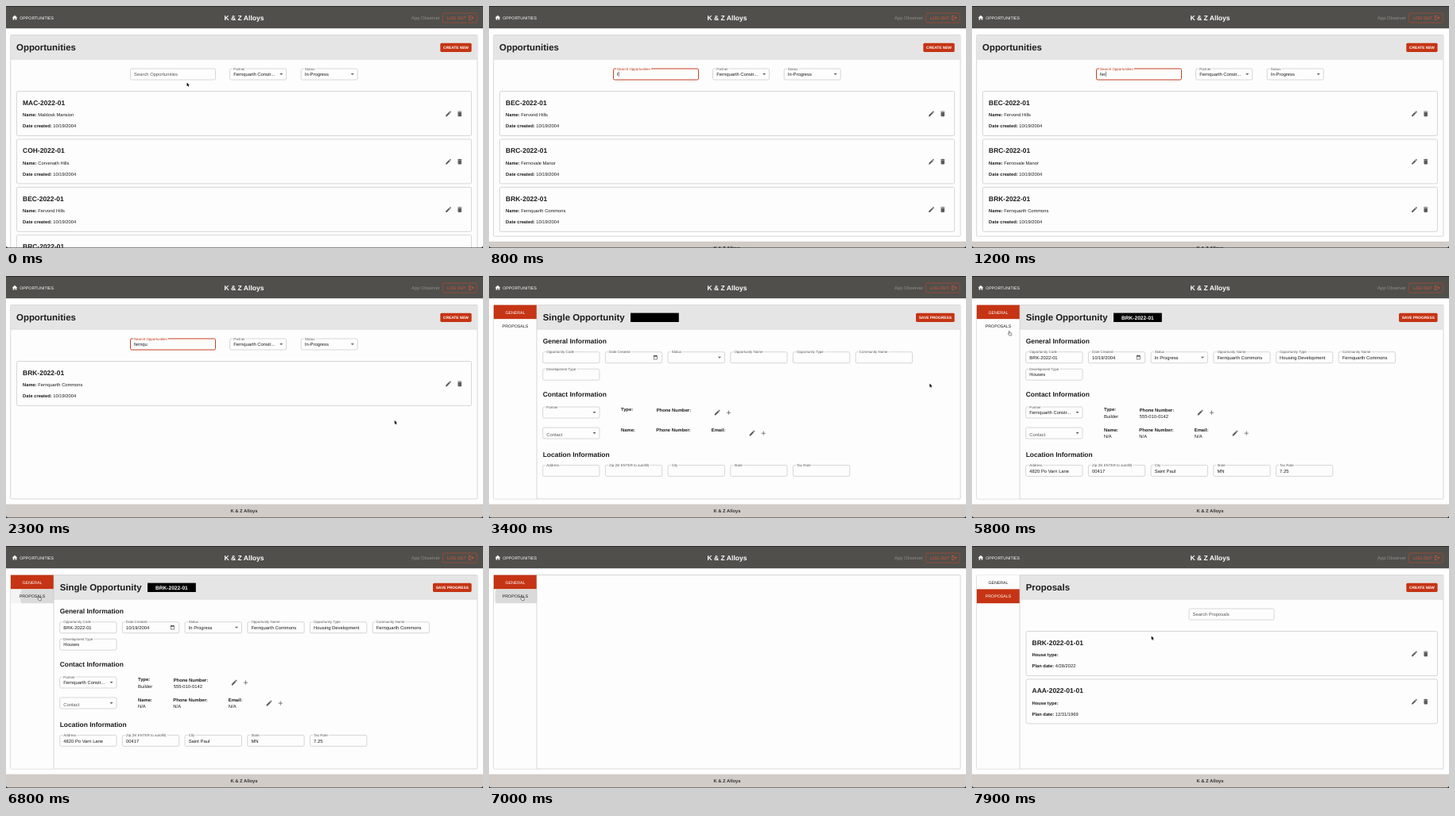
An HTML page for the animation above (8 s loop, 600 by 305 pixels).

```html
<!DOCTYPE html>
<html lang="en">
<head>
<meta charset="utf-8">
<title>Opportunities</title>
<style>
  html, body { margin: 0; width: 100%; height: 100%; overflow: hidden; background: #fefefe; }
  svg { display: block; width: 100%; height: 100%; }
  text { font-family: "Liberation Sans", Arial, sans-serif; text-rendering: geometricPrecision; white-space: pre; }
</style>
</head>
<body>
<svg id="stage" viewBox="0 0 600 305" xmlns="http://www.w3.org/2000/svg"></svg>
<script>
const LOOP = 8000, STEP = 100;
const RED = '#c53414', INK = '#1c1c1c', SOFT = '#5a5a5a', LINE = '#c6c6c6', BAND = '#e5e5e5', PAPER = '#fdfdfd';
const COMPANY = 'K &amp; Z Alloys', PARTNER = 'Fernquarth Constr...';

// Moments of the hard changes
const FOCUS = 300, OPEN = 3400, FILLED = 3500, HOVER = 5800, PRESS = 6700, BLANK = 6900, LOADED = 7200;

const ICONS = {
  edit: 'M3 17.25V21h3.75L17.81 9.94l-3.75-3.75zM20.71 7.04c.39-.39.39-1.02 0-1.41l-2.34-2.34c-.39-.39-1.02-.39-1.41 0l-1.83 1.83 3.75 3.75z',
  trash: 'M6 19c0 1.1.9 2 2 2h8c1.1 0 2-.9 2-2V7H6zM19 4h-3.5l-1-1h-5l-1 1H5v2h14z',
  plus: 'M19 13h-6v6h-2v-6H5v-2h6V5h2v6h6z',
  home: 'M10 20v-6h4v6h5v-8h3L12 3 2 12h3v8z',
  exit: 'M17 7l-1.4 1.4 2.6 2.6H8v2h10.2l-2.6 2.6L17 17l5-5zM4 5h8V3H4c-1.1 0-2 .9-2 2v14c0 1.1.9 2 2 2h8v-2H4z',
  arrow: 'M7 10l5 5 5-5z',
  calendar: 'M20 3h-1V1h-2v2H7V1H5v2H4a2 2 0 0 0-2 2v16c0 1.1.9 2 2 2h16a2 2 0 0 0 2-2V5a2 2 0 0 0-2-2zm0 18H4V8h16z'
};

const DEALS = [
  ['MAC-2022-01', 'Maldosk Mansion'],
  ['COH-2022-01', 'Corvenath Hills'],
  ['BEC-2022-01', 'Fervond Hills'],
  ['BRC-2022-01', 'Fernovale Manor'],
  ['BRK-2022-01', 'Fernquarth Commons']
];

// Search text over time
const TYPED = [[0, ''], [700, 'f'], [1000, 'fe'], [1200, 'fer'], [1400, 'fern'], [1500, 'fernqu']];

// Pointer path: time, x, y
const PATH = [
  [0, 227.5, 96.5], [1700, 227.5, 96.5], [2300, 488.8, 182], [2600, 553, 136.8], [2900, 554.3, 135.5],
  [4600, 554.3, 135.5], [4900, 275, 121], [5100, 275, 121], [5400, 68, 94], [5500, 68, 94],
  [5800, 46.5, 69.3], [6200, 41, 62.8], [7700, 41, 62.8], [7900, 225.7, 113.5], [8000, 225.7, 113.5]
];

const clamp = v => Math.max(0, Math.min(1, v));
const mix = (a, b, k) => a + (b - a) * k;
const ramp = (t, from, length) => clamp((t - from) / length);

function text(x, y, str, size = 5.83, { fill = INK, bold = false, anchor = 'start' } = {}) {
  return `<text x="${x}" y="${y}" font-size="${size}" fill="${fill}" text-anchor="${anchor}"` +
    `${bold ? ' font-weight="700"' : ''}>${str}</text>`;
}

function rect(x, y, w, h, fill, stroke = 'none', r = 0, width = .7) {
  return `<rect x="${x}" y="${y}" width="${w}" height="${h}" rx="${r}" fill="${fill}" stroke="${stroke}" stroke-width="${width}"/>`;
}

function icon(name, cx, cy, size = 9, fill = '#5c5c5c') {
  const k = size / 24;
  return `<path d="${ICONS[name]}" fill="${fill}" transform="translate(${cx - size / 2} ${cy - size / 2}) scale(${k})"/>`;
}

const measureCtx = document.createElement('canvas').getContext('2d');
function textWidth(str, size) {
  measureCtx.font = '100px "Liberation Sans", Arial, sans-serif';
  return measureCtx.measureText(str).width * size / 100;
}

// Outlined field; rise moves the label from the middle to the border
function field(x, y, w, label, value, { rise = 1, active = false, mark = '' } = {}) {
  const color = active ? RED : SOFT;
  const size = mix(5.83, 4.45, rise);
  let out = rect(x, y, w, 14, 'none', active ? RED : LINE, 1.7, active ? .95 : .7);
  if (rise > .5) out += rect(x + 3.7, y - 1, textWidth(label, size) + 1.8, 2, PAPER);
  out += text(x + 4.6, mix(y + 9.1, y + 1.6, rise), label, size, { fill: color });
  out += text(x + 4.6, y + 9.1, value);
  if (mark === 'arrow') out += icon('arrow', x + w - 6.4, y + 6.8, 10);
  if (mark === 'calendar') out += icon('calendar', x + w - 8.4, y + 6.8, 5.8, '#222');
  return out;
}

function button(x, w, label) {
  return rect(x, 46.7, w, 11.2, RED, 'none', 1.6) +
    text(x + w / 2, 54, label, 4.8, { fill: '#fff', bold: true, anchor: 'middle' });
}

function pair(x, y, label, value) {
  return `<text x="${x}" y="${y}" font-size="5.78" fill="${INK}"><tspan font-weight="700">${label}</tspan> ${value}</text>`;
}

function card(x, i, code, line1, line2) {
  const y = 107.5 + i * 60.4;
  return rect(x, y, 585.5 - x, 56, PAPER, LINE, 1.8) +
    text(x + 7.6, y + 17.3, code, 8.45, { bold: true }) +
    pair(x + 7.6, y + 31.7, ...line1) +
    pair(x + 7.6, y + 45.6, ...line2) +
    icon('edit', 556.5, y + 28.3) + icon('trash', 570.7, y + 28.3);
}

function panel(bottom, band = true) {
  return rect(5.7, 36.5, 587.3, bottom - 36.5, PAPER, LINE, 1) +
    (band ? rect(6, 36.8, 586.7, 30, BAND) + rect(6, 66.7, 586.7, .7, '#cfcfcf') : '');
}

function title(x, str) {
  return text(x, 56, str, 11.45, { bold: true });
}

function topBar() {
  return rect(0, 0, 600, 28.2, '#504f4c') + rect(0, 0, 600, .8, '#222') +
    icon('home', 11, 14.8, 8, '#fff') +
    text(17.2, 16.8, 'OPPORTUNITIES', 5.27, { fill: '#fff' }) +
    text(299.5, 18, COMPANY, 8.55, { fill: '#fff', bold: true, anchor: 'middle' }) +
    text(510, 17, 'App Observer', 5.83, { fill: '#8f8d8a' }) +
    rect(549.4, 9, 42.8, 12, 'none', '#b04a2c', 1.6) +
    text(555, 16.9, 'LOG OUT', 5.3, { fill: '#e4552d' }) +
    icon('exit', 585.2, 14.9, 7.6, '#e4552d');
}

function footer(y) {
  return rect(0, y, 600, 305 - y, '#d1ccc8') +
    text(299.5, y + 10.6, COMPANY, 5.83, { fill: '#333', bold: true, anchor: 'middle' });
}

// Dark window edge with rounded lower corners
function windowEdge() {
  return '<path d="M0 301.5Q0 304.4 3 304.4H597Q600 304.4 600 301.5V305H0Z" fill="#222"/>';
}

function ripple(t) {
  if (t < PRESS) return '';
  const r = 40 * Math.sqrt(ramp(t, PRESS - 100, 550));
  const alpha = .1 * (1 - ramp(t, LOADED, 300));
  return `<clipPath id="tab"><rect x="6" y="54.4" width="54" height="17.8"/></clipPath>` +
    `<circle cx="42" cy="64" r="${r}" fill="#000" fill-opacity="${alpha}" clip-path="url(#tab)"/>`;
}

function tabs(chosen, t) {
  const shade = Math.round(mix(253, 243, ramp(t, HOVER, 300)));
  const tab = (y, name, on, bg) => rect(6, y, 54, 17.8, on ? RED : bg);
  const name = (y, str, on) => text(33, y, str, 5.25, { fill: on ? '#fff' : INK, anchor: 'middle' });
  return rect(6, 36.8, 54, 243.9, PAPER) +
    tab(36.6, 'GENERAL', chosen === 0, PAPER) +
    tab(54.4, 'PROPOSALS', chosen === 1, `rgb(${shade},${shade},${shade})`) +
    ripple(t) +
    name(47.5, 'GENERAL', chosen === 0) + name(65.4, 'PROPOSALS', chosen === 1) +
    rect(59.7, 36.8, .7, 244, LINE);
}

function listPage(t) {
  const [typedAt, query] = TYPED.filter(([at]) => at <= t).pop();
  const shown = DEALS.filter(([, name]) => name.toLowerCase().includes(query));
  const bottom = Math.max(281, 109 + shown.length * 60.4);
  const active = t >= FOCUS;
  const caret = active && Math.floor((t - Math.max(FOCUS, typedAt)) / 500) % 2 === 0;
  let out = panel(bottom) + title(13, 'Opportunities') + button(546.3, 39.3, 'CREATE NEW');
  out += field(156.5, 79, 107, 'Search Opportunities', query, { rise: ramp(t, FOCUS - 100, 200), active });
  if (caret) out += rect(161.3 + textWidth(query, 5.83), 82.6, .5, 6.6, INK);
  out += field(281.6, 79, 71, 'Partner', PARTNER, { mark: 'arrow' });
  out += field(371.2, 79, 71, 'Status', 'In-Progress', { mark: 'arrow' });
  shown.forEach(([code, name], i) => {
    out += card(13.5, i, code, ['Name:', name], ['Date created:', '10/19/2004']);
  });
  return out + footer(bottom + 6.6);
}

function formPage(t) {
  const val = s => t >= FILLED ? s : '';
  const col = i => 67.7 + i * 78.7;
  const row = (y, items) => items.map(([label, value, mark], i) =>
    field(col(i), y, 71.3, label, val(value), { mark })).join('');
  const head = (y, s) => text(67.7, y, s, 8.45, { bold: true });
  const fact = (x, y, label, value) => text(x, y, label, 5.83, { bold: true }) + text(x, y + 8.3, val(value));
  return panel(281) + tabs(0, t) +
    title(67.7, 'Single Opportunity') + rect(178, 46.6, 60.8, 11.4, '#000') +
    text(208.4, 54.6, val('BRK-2022-01'), 6.6, { fill: '#fff', bold: true, anchor: 'middle' }) +
    button(537, 48.6, 'SAVE PROGRESS') +
    head(84.9, 'General Information') +
    row(95.7, [
      ['Opportunity Code', 'BRK-2022-01'], ['Date Created', '10/19/2004', 'calendar'],
      ['Status', 'In Progress', 'arrow'], ['Opportunity Name', 'Fernquarth Commons'],
      ['Opportunity Type', 'Housing Development'], ['Community Name', 'Fernquarth Commons']
    ]) +
    row(117.2, [['Development Type', 'Houses']]) +
    head(151.8, 'Contact Information') +
    row(165, [['Partner', PARTNER, 'arrow']]) +
    fact(166, 170.2, 'Type:', 'Builder') + fact(210.7, 170.8, 'Phone Number:', '555-010-0142') +
    icon('edit', 287.2, 172) + icon('plus', 301.5, 172) +
    rect(67.7, 191, 71.3, 14, 'none', LINE, 1.7) + text(72.3, 202, 'Contact', 5.83, { fill: SOFT }) +
    icon('arrow', 132.6, 197.8, 10) +
    fact(166, 195.6, 'Name:', 'N/A') + fact(210.3, 195.6, 'Phone Number:', 'N/A') +
    fact(279.8, 195.6, 'Email:', 'N/A') +
    icon('edit', 331, 198) + icon('plus', 345.2, 198) +
    head(227.6, 'Location Information') +
    row(238.4, [
      ['Address', '4820 Po Varn Lane'], ['Zip (hit ENTER to autofill)', '00417'],
      ['City', 'Saint Paul'], ['State', 'MN'], ['Tax Rate', '7.25']
    ]) + footer(287.6);
}

function proposalsPage(t) {
  if (t < LOADED) return panel(281, false) + tabs(0, t) + footer(287.6);
  let out = panel(281) + tabs(1, t) + title(67.7, 'Proposals') + button(546.3, 39.3, 'CREATE NEW') +
    field(273, 79, 107, 'Search Proposals', '', { rise: 0 });
  [['BRK-2022-01-01', '4/28/2022'], ['AAA-2022-01-01', '12/31/1969']].forEach(([code, date], i) => {
    out += card(68, i, code, ['House type:', ''], ['Plan date:', date]);
  });
  return out + footer(287.6);
}

function pointer(t) {
  if (t >= 100 && t < 1800) return '';
  const i = Math.max(1, PATH.findIndex(([at]) => at >= t));
  const [t0, x0, y0] = PATH[i - 1], [t1, x1, y1] = PATH[i];
  const k = ramp(t, t0, t1 - t0);
  const x = mix(x0, x1, k), y = mix(y0, y1, k);
  const overTab = t >= OPEN && x < 60 && y < 73;
  const overEdit = t >= 2600 && t < OPEN;
  const at = `transform="translate(${x} ${y}) scale(.88)"`;
  return overTab || overEdit
    ? `<path ${at} d="M-.2 .3Q.4-.4 .9.3V2.5L3.4 3Q4.2 3.3 4 4.2L3.5 6.6H.6L-1.5 4Q-1.4 3.1-.2 3.8Z" fill="#eee" stroke="#333" stroke-width=".6"/>`
    : `<path ${at} d="M0 0V5.2L1.2 4.2 2 6 2.9 5.6 2.1 3.8H3.7Z" fill="#000" stroke="#fff" stroke-width=".4" paint-order="stroke"/>`;
}

function draw(t) {
  const page = t < OPEN ? listPage : t < BLANK ? formPage : proposalsPage;
  return rect(0, 0, 600, 305, '#fefefe') + page(t) + topBar() + windowEdge() + pointer(t);
}

const stage = document.getElementById('stage');
const start = performance.now();
let last = -1;
function tick() {
  const t = Math.floor(((performance.now() - start) % LOOP) / STEP) * STEP;
  if (t !== last) {
    stage.innerHTML = draw(t);
    last = t;
  }
  requestAnimationFrame(tick);
}
tick();
</script>
</body>
</html>
```
